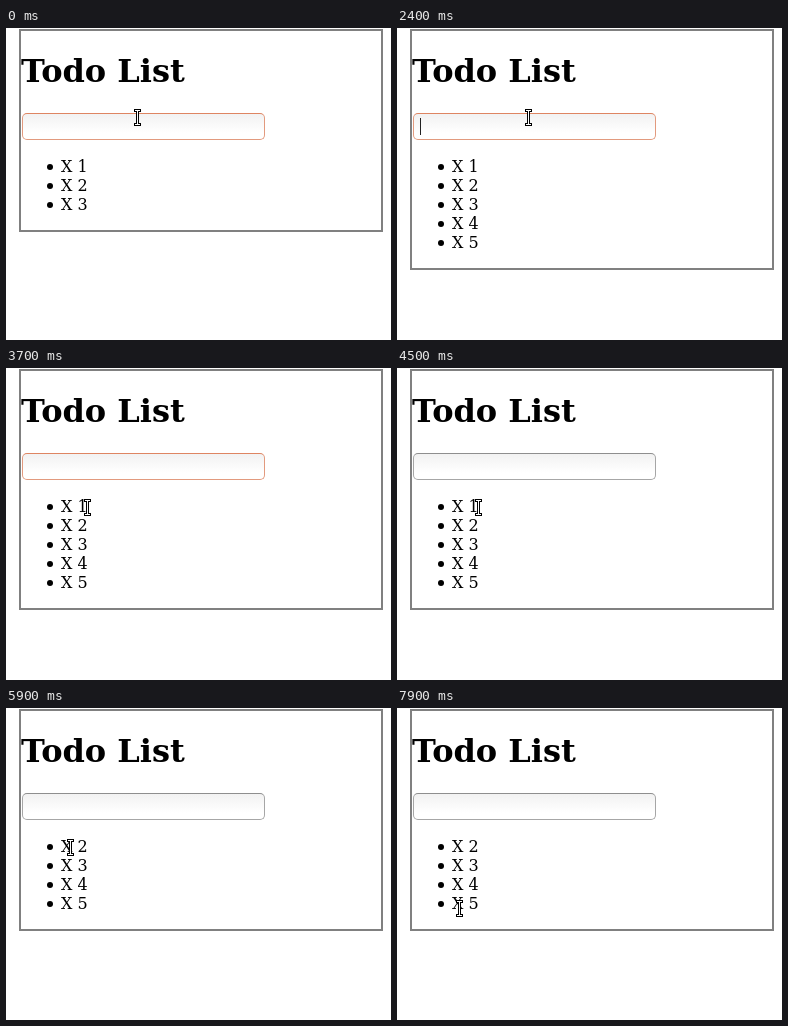
Animation, 385 px wide and 312 px high, one loop 8000 ms. Source, as an HTML page:

```html
<!DOCTYPE html>
<html lang="en">
<head>
<meta charset="utf-8">
<title>Todo List</title>
<style>
  html, body { margin: 0; width: 100%; height: 100%; overflow: hidden; background: #fff; }
  body { position: relative; font: 16px/19px "DejaVu Serif", serif; color: #000; }
  body * { box-sizing: border-box; animation: 8s step-end infinite; }
  .panel, h1, .field, .field *, .list, .pointer { position: absolute; }

  .panel { left: 13px; top: 1px; width: 364px; height: 203px; border: 2px solid #808080; animation-name: panel; }
  h1 { left: 15px; top: 24px; margin: 0; font-size: 32px; line-height: 38px; white-space: nowrap; }

  .field {
    left: 16px; top: 85px; width: 243px; height: 27px;
    border: 1px solid #a6a6a6; border-top-color: #8e8e8e; border-radius: 5px;
    background: linear-gradient(#f2f2f2, #fff 75%);
    animation-name: blur;
  }
  .field span { left: 6px; top: 4px; font: 13.333px/17px "DejaVu Sans", sans-serif; opacity: 0; }
  .four { animation-name: four; }
  .five { animation-name: five; }
  .caret { left: 6px; top: 4px; width: 1px; height: 17px; background: #222; animation-name: caret; }

  .list { left: 15px; top: 129px; width: 360px; height: 57px; overflow: hidden; animation-name: list; }
  ul { margin: 0; padding: 0 0 0 40px; list-style: none; animation-name: remove; }
  li { position: relative; height: 19px; }
  li::before {
    content: ""; position: absolute; left: -14px; top: 7px;
    width: 6px; height: 6px; border-radius: 50%; background: currentColor;
  }
  li:first-child { animation-name: first-done; }
  li:last-child { animation-name: last-done; }

  .pointer { left: 0; top: 0; width: 8px; height: 17px; animation-name: pointer; }
  .pointer path { fill: none; stroke-linecap: square; }

  /* 100 ms = 1.25% */
  @keyframes panel {
    0% { height: 203px; } 17.5% { height: 222px; }
    30% { height: 241px; } 72.5%, 100% { height: 222px; }
  }
  @keyframes list {
    0% { height: 57px; } 17.5% { height: 76px; }
    30% { height: 95px; } 72.5%, 100% { height: 76px; }
  }
  @keyframes remove { 0% { transform: none; } 72.5%, 100% { transform: translateY(-19px); } }
  @keyframes blur {
    0% { border-color: #de8562 #e29a7e #e29a7e; }
    48.75%, 100% { border-color: #8e8e8e #a6a6a6 #a6a6a6; }
  }
  @keyframes four { 0% { opacity: 0; } 12.5% { opacity: 1; } 17.5%, 100% { opacity: 0; } }
  @keyframes five { 0% { opacity: 0; } 23.75% { opacity: 1; } 30%, 100% { opacity: 0; } }
  @keyframes caret {
    0% { opacity: 0; left: 6px; }
    11.25% { opacity: 1; left: 6px; }
    12.5% { opacity: 1; left: 14px; }
    17.5% { opacity: 1; left: 6px; }
    23.75% { opacity: 1; left: 14px; }
    27.5% { opacity: 0; left: 14px; }
    30% { opacity: 1; left: 6px; }
    38.75%, 100% { opacity: 0; left: 6px; }
  }
  @keyframes first-done { 0% { color: #000; } 50% { color: #808080; } 56.25%, 100% { color: #000; } }
  @keyframes last-done { 0% { color: #000; } 86.25% { color: #808080; } 95%, 100% { color: #000; } }
  @keyframes pointer {
    0% { transform: translate(128px, 81px); }
    38.75% { transform: translate(126px, 84px); }
    40% { transform: translate(119px, 97px); }
    41.25% { transform: translate(107px, 119px); }
    42.5% { transform: translate(97px, 135px); }
    43.75% { transform: translate(88px, 141px); }
    45% { transform: translate(81px, 136px); }
    46.25% { transform: translate(78px, 131px); }
    60% { transform: translate(76px, 131px); }
    61.25% { transform: translate(72px, 131px); }
    62.5% { transform: translate(68px, 131px); }
    63.75% { transform: translate(64px, 131px); }
    65% { transform: translate(62px, 131px); }
    68.75% { transform: translate(61px, 131px); }
    76.25% { transform: translate(62px, 137px); }
    77.5% { transform: translate(64px, 150px); }
    78.75% { transform: translate(67px, 166px); }
    80% { transform: translate(70px, 180px); }
    81.25% { transform: translate(72px, 189px); }
    82.5% { transform: translate(73px, 192px); }
    97.5% { transform: translate(65px, 192px); }
    98.75%, 100% { transform: translate(59px, 192px); }
  }
</style>
</head>
<body>
  <div class="panel"></div>
  <h1>Todo List</h1>
  <div class="field">
    <span class="four">4</span>
    <span class="five">5</span>
    <i class="caret"></i>
  </div>
  <div class="list">
    <ul>
      <li>X 1</li>
      <li>X 2</li>
      <li>X 3</li>
      <li>X 4</li>
      <li>X 5</li>
    </ul>
  </div>
  <svg class="pointer" viewBox="0 0 8 17">
    <path d="M1.5 1.5H5.5M3.5 1.5V15.5M1.5 15.5H5.5" stroke="#000" stroke-width="3"/>
    <path d="M1.5 1.5H5.5M3.5 1.5V15.5M1.5 15.5H5.5" stroke="#fff" stroke-width="1"/>
  </svg>
</body>
</html>
```
